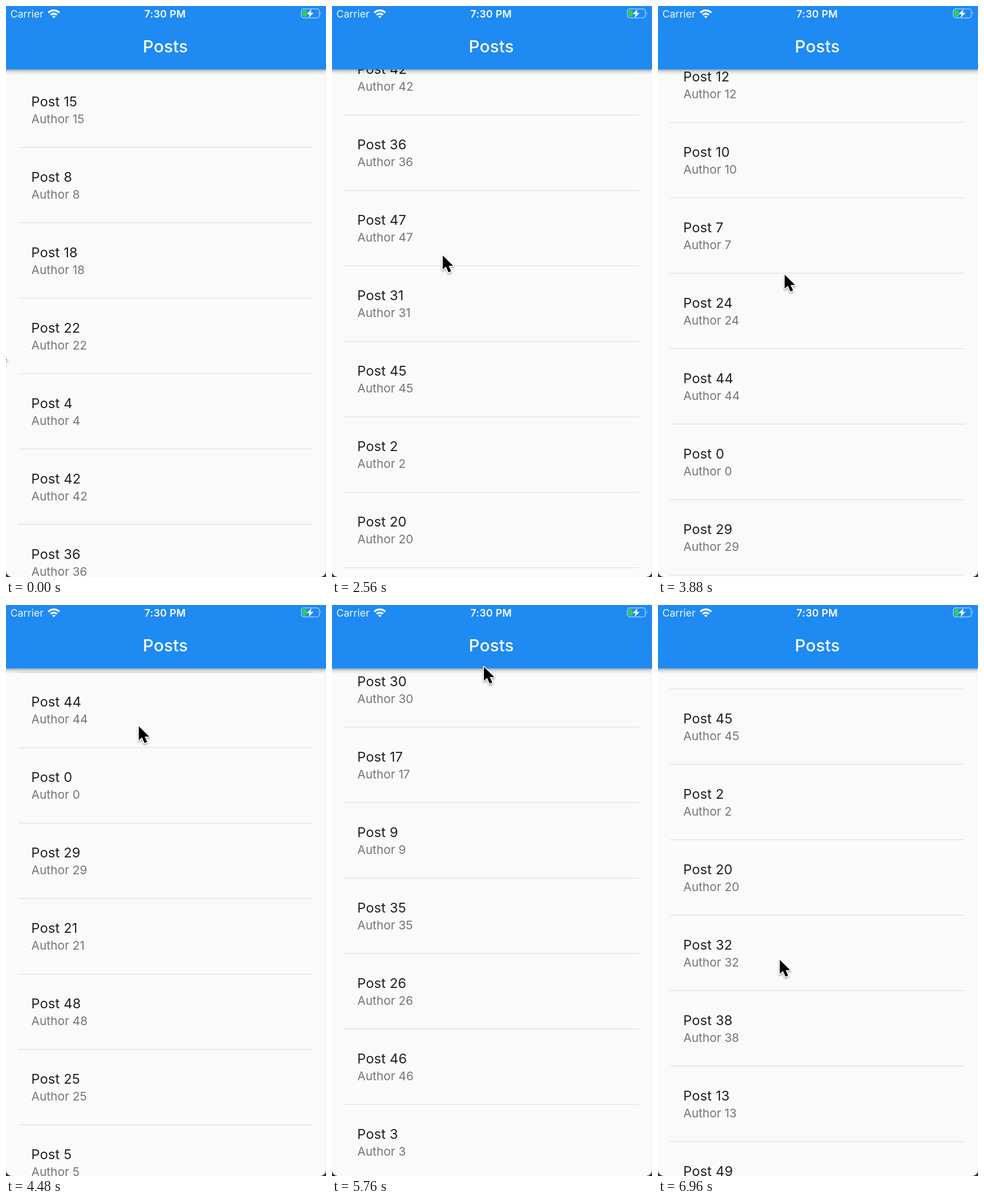
Recreate the animation shown at these times as an HTML page. Size 552 by 984 pixels, loop 7000 ms.

```html
<!DOCTYPE html>
<html lang="en">
<head>
<meta charset="utf-8">
<title>Posts</title>
<style>
  html, body { margin: 0; width: 100%; height: 100%; overflow: hidden; background: #fafafa; }
  svg { display: block; width: 552px; height: 984px; font-family: Inter, Roboto, sans-serif; }
  .title { font-size: 23.3px; fill: #212121; }
  .author { font-size: 20.5px; fill: #757575; }
  .bar { fill: #fff; }
</style>
</head>
<body>
<svg viewBox="0 0 552 984">
  <defs>
    <linearGradient id="shade" x1="0" y1="0" x2="0" y2="1">
      <stop offset="0" stop-color="#000" stop-opacity=".34"/>
      <stop offset=".4" stop-color="#000" stop-opacity=".12"/>
      <stop offset="1" stop-color="#000" stop-opacity="0"/>
    </linearGradient>
    <filter id="drop" x="-50%" y="-50%" width="200%" height="200%">
      <feDropShadow dx="0" dy="2" stdDeviation="1.5" flood-color="#000" flood-opacity=".4"/>
    </filter>
  </defs>
  <rect width="552" height="984" fill="#fafafa"/>
  <g id="list"></g>

  <rect y="109.5" width="552" height="9" fill="url(#shade)"/>
  <rect width="552" height="109.5" fill="#1e8af2"/>
  <rect x="551" y="110" width="1" height="874" fill="#f0f0f0"/>
  <g class="bar">
    <text x="7.5" y="19.5" font-size="17.5" fill-opacity=".93">Carrier</text>
    <text x="274.5" y="19.5" font-size="17.5" font-weight="600" letter-spacing=".25" text-anchor="middle">7:30 PM</text>
    <text x="275" y="79.5" font-size="29" font-weight="500" letter-spacing=".2" text-anchor="middle">Posts</text>
  </g>
  <g fill="none" stroke="#fff" stroke-width="3.2">
    <path d="M73 11.5a13.5 13.5 0 0 1 19 0"/>
    <path d="M77 15.4a8 8 0 0 1 11 0"/>
    <path d="M82.5 21l-3-3a4.2 4.2 0 0 1 6 0z" fill="#fff" stroke="none"/>
  </g>
  <rect x="509.5" y="5" width="31" height="15.5" rx="4" fill="none" stroke="#fff" stroke-opacity=".55" stroke-width="1.5"/>
  <path d="M542.5 10q2 2.7 0 5.4z" fill="#fff" fill-opacity=".6"/>
  <rect x="511.5" y="7" width="7" height="11.5" rx="2" fill="#30d14b"/>
  <path d="M527 5.5l-8.5 8.5h5l-1.5 6.5 8.5-8.7h-5z" fill="#fff"/>

  <path d="M0 974v10h10a10 10 0 0 1-10-10zM552 974v10h-10a10 10 0 0 0 10-10z" fill="#303030"/>
  <g id="pointer" filter="url(#drop)">
    <path d="M1 1.5V25.5L6.5 20.5 11 30.5 15.5 28.5 11.2 19.2H19z" fill="#000" stroke="#fff" stroke-width="3" paint-order="stroke" stroke-linejoin="round"/>
  </g>
</svg>
<script>
const LOOP = 7000, TICK = 40, PITCH = 130, HOLD = 80;
const ids = [15, 8, 18, 22, 4, 42, 36, 47, 31, 45, 2, 20, 32, 38, 13, 49, 11, 39, 12, 10, 7, 24,
  44, 0, 29, 21, 48, 25, 5, 30, 17, 9, 35, 26, 46, 3, 14, 40];

// Each swipe drags the list with the pointer, then lets it glide
const swipes = [
  { down: 1300, up: 1920, x: [183, 219], y: [600, 79], glide: 13 },
  { down: 2440, up: 2685, x: [190, 190], y: [600, 100], glide: 479 },
  { down: 3240, up: 3503, x: [190, 190], y: [600, 100], glide: 452 },
  { down: 4240, up: 4522, x: [228, 228], y: [600, 100], glide: 343 },
  { down: 5400, up: 5760, x: [230, 261], y: [600, 105], glide: 100 },
  { down: 6200, up: 6360, x: [255, 209], y: [128, 610], glide: -2291 }
];

const list = document.getElementById('list');
const pointer = document.getElementById('pointer');

list.innerHTML = ids.map((id, i) => `<g transform="translate(0 ${i * PITCH})">
  <text class="title" x="43.5" y="172.5" letter-spacing=".15">Post ${id}</text>
  <text class="author" x="43.8" y="201.5">Author ${id}</text>
  <path d="M20.5 243.5H529.5" stroke="#e4e4e4" stroke-width="1.5"/></g>`).join('');

const progress = (t, a, b) => Math.min(1, Math.max(0, (t - a) / (b - a)));
const mix = ([a, b], u) => a + (b - a) * u;
const flick = u => u ** 1.5;
const smooth = u => u * u * (3 - 2 * u);
const slow = u => 1 - (1 - u) ** 2;

function scroll(t) {
  return swipes.reduce((sum, s, i) => {
    const next = swipes[i + 1]?.down ?? LOOP + HOLD;
    return sum + (s.y[0] - s.y[1]) * flick(progress(t, s.down, s.up))
      + s.glide * slow(progress(t, s.up, next - HOLD));
  }, 0);
}

function place(t) {
  const i = swipes.findLastIndex(s => t >= s.down);
  if (i < 0) return [mix([-17, 183], slow(progress(t, 0, 280))), mix([591, 595], progress(t, 640, 760))];
  const s = swipes[i], next = swipes[i + 1];
  if (t < s.up || !next) {
    const u = flick(progress(t, s.down, s.up));
    return [mix(s.x, u), mix(s.y, u)];
  }
  const u = smooth(progress(t, s.up, next.down - 2 * HOLD));
  return [mix([s.x[1], next.x[0]], u), mix([s.y[1], next.y[0]], u)];
}

function draw(now) {
  const t = Math.floor(now % LOOP / TICK) * TICK;
  const [x, y] = place(t);
  list.setAttribute('transform', `translate(0 ${-scroll(t).toFixed(2)})`);
  pointer.setAttribute('transform', `translate(${x.toFixed(2)} ${y.toFixed(2)})`);
}

let start;
function frame(now) {
  start ??= now;
  draw(now - start);
  requestAnimationFrame(frame);
}
draw(0);
requestAnimationFrame(frame);
</script>
</body>
</html>
```
